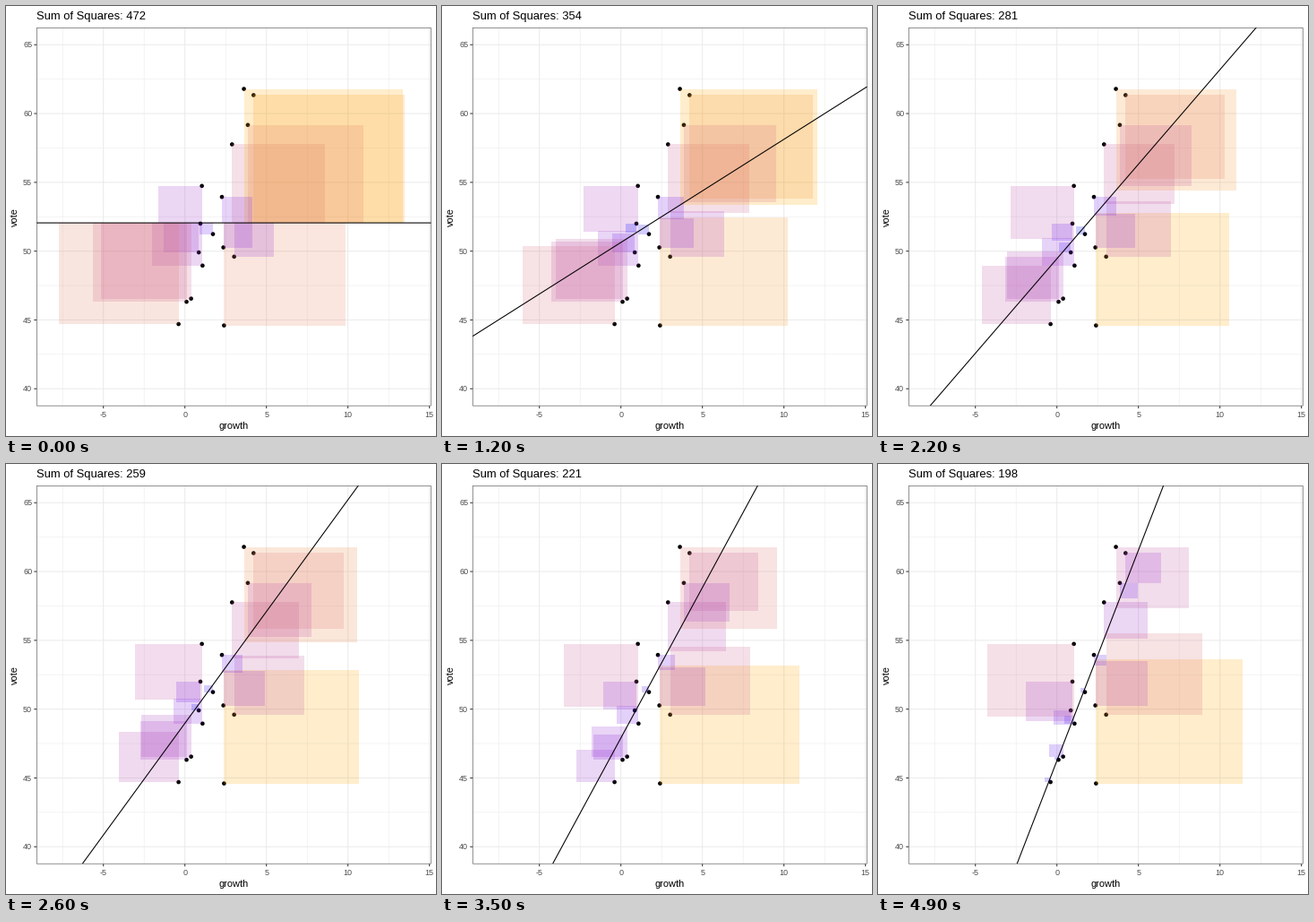
Write a matplotlib script that moves like this. It is 480 px wide and 480 px high and loops after 5000 ms.

```python
import numpy as np
import matplotlib.pyplot as plt
from matplotlib.animation import FuncAnimation
from matplotlib.patches import Circle, Rectangle

SIZE, DPI = 480, 72
FRAMES, INTERVAL = 50, 100
LEFT, RIGHT, TOP, BOTTOM = 34.1, 474.5, 24.05, 446.45
XMIN, XMAX, YMIN, YMAX = -9.1, 15.1, 38.75, 66.25
LINE = 1.067

# The observations: (growth, vote)
growth, vote = np.array([
    (2.4, 44.6), (2.89, 57.76), (0.85, 49.91), (4.21, 61.34),
    (3.02, 49.6), (3.62, 61.79), (1.08, 48.95), (-0.39, 44.7),
    (3.86, 59.17), (2.27, 53.94), (0.38, 46.55), (1.04, 54.74),
    (2.36, 50.27), (1.72, 51.24), (0.1, 46.32), (0.95, 52.0)]).T
best_slope = np.polyfit(growth, vote, 1)[0]
side = np.where(growth > growth.mean(), 1, -1)

plt.rcParams["font.family"] = "Liberation Sans"


def px(x):
    return LEFT + (x - XMIN) / (XMAX - XMIN) * (RIGHT - LEFT)


def py(y):
    return BOTTOM - (y - YMIN) / (YMAX - YMIN) * (BOTTOM - TOP)


def gradient(t):
    """Blue to orange, close to an even blend in CIE Lab."""
    return np.column_stack([t**0.38, 0.647 * t**0.9, (1 - t)**0.7])


fig = plt.figure(figsize=(SIZE / DPI, SIZE / DPI), dpi=DPI, facecolor="white")
ax = fig.add_axes([0, 0, 1, 1])
ax.set(xlim=(0, SIZE), ylim=(SIZE, 0))
ax.axis("off")


def segment(xs, ys, color, width=LINE, z=1):
    return ax.plot(xs, ys, color=color, lw=width, zorder=z, snap=False,
                   solid_capstyle="butt")[0]


def label(x, y, text, size, color="black", **kw):
    return ax.text(x, y, text, fontsize=size, color=color, **kw)


# Grid, minor lines first
for start, width in ((2.5, LINE / 2), (0, LINE)):
    for x in np.arange(-10 + start, XMAX, 5):
        if x > XMIN:
            segment([px(x)] * 2, [TOP, BOTTOM], "0.92", width)
    for y in np.arange(40 + start, YMAX, 5):
        segment([LEFT, RIGHT], [py(y)] * 2, "0.92", width)

# Ticks and their labels
for x in range(-5, 16, 5):
    segment([px(x)] * 2, [BOTTOM, BOTTOM + 2.75], "0.2")
    label(px(x), 458.6, str(x), 9, "0.3", ha="center")
for y in range(40, 66, 5):
    segment([LEFT - 2.75, LEFT], [py(y)] * 2, "0.2")
    label(LEFT - 4.95, py(y) + 3.2, str(y), 9, "0.3", ha="right")

label((LEFT + RIGHT) / 2, 472.2, "growth", 11, ha="center")
label(13.3, (TOP + BOTTOM) / 2, "vote", 11, ha="center", rotation=90,
      rotation_mode="anchor")
title = label(LEFT, 15, "", 13)

for center in zip(px(growth), py(vote)):
    ax.add_patch(Circle(center, 2.31, fc="black", lw=0, zorder=2))
squares = [ax.add_patch(Rectangle((0, 0), 0, 0, lw=0, alpha=0.2, zorder=3,
                                  antialiased=False)) for _ in growth]
fit_line = segment([LEFT, RIGHT], [0, 0], "black", z=4)
fit_line.set_clip_path(Rectangle((LEFT, TOP), RIGHT - LEFT, BOTTOM - TOP,
                                 transform=ax.transData))

# Only the inner half of the panel border is visible
inset = LINE / 4
ax.add_patch(Rectangle((LEFT + inset, TOP + inset), RIGHT - LEFT - 2 * inset,
                       BOTTOM - TOP - 2 * inset, fill=False, ec="0.2",
                       lw=LINE / 2, snap=False, zorder=5))


def update(frame):
    slope = best_slope * frame / (FRAMES - 1)

    def predict(x):
        return vote.mean() + slope * (x - growth.mean())

    fitted = predict(growth)
    error = np.abs(vote - fitted)
    colors = gradient((error - error.min()) / np.ptp(error))
    x0, x1 = px(growth), px(growth + side * error)
    y0, y1 = py(vote), py(fitted)
    for i, square in enumerate(squares):
        square.set_bounds(min(x0[i], x1[i]), min(y0[i], y1[i]),
                          abs(x1[i] - x0[i]), abs(y1[i] - y0[i]))
        square.set_facecolor(colors[i])
    fit_line.set_ydata([py(predict(XMIN)), py(predict(XMAX))])
    title.set_text(f"Sum of Squares: {np.sum(error**2):.0f}")
    return [*squares, fit_line, title]


anim = FuncAnimation(fig, update, frames=FRAMES, interval=INTERVAL,
                     repeat=True, repeat_delay=0)
plt.show()
```
